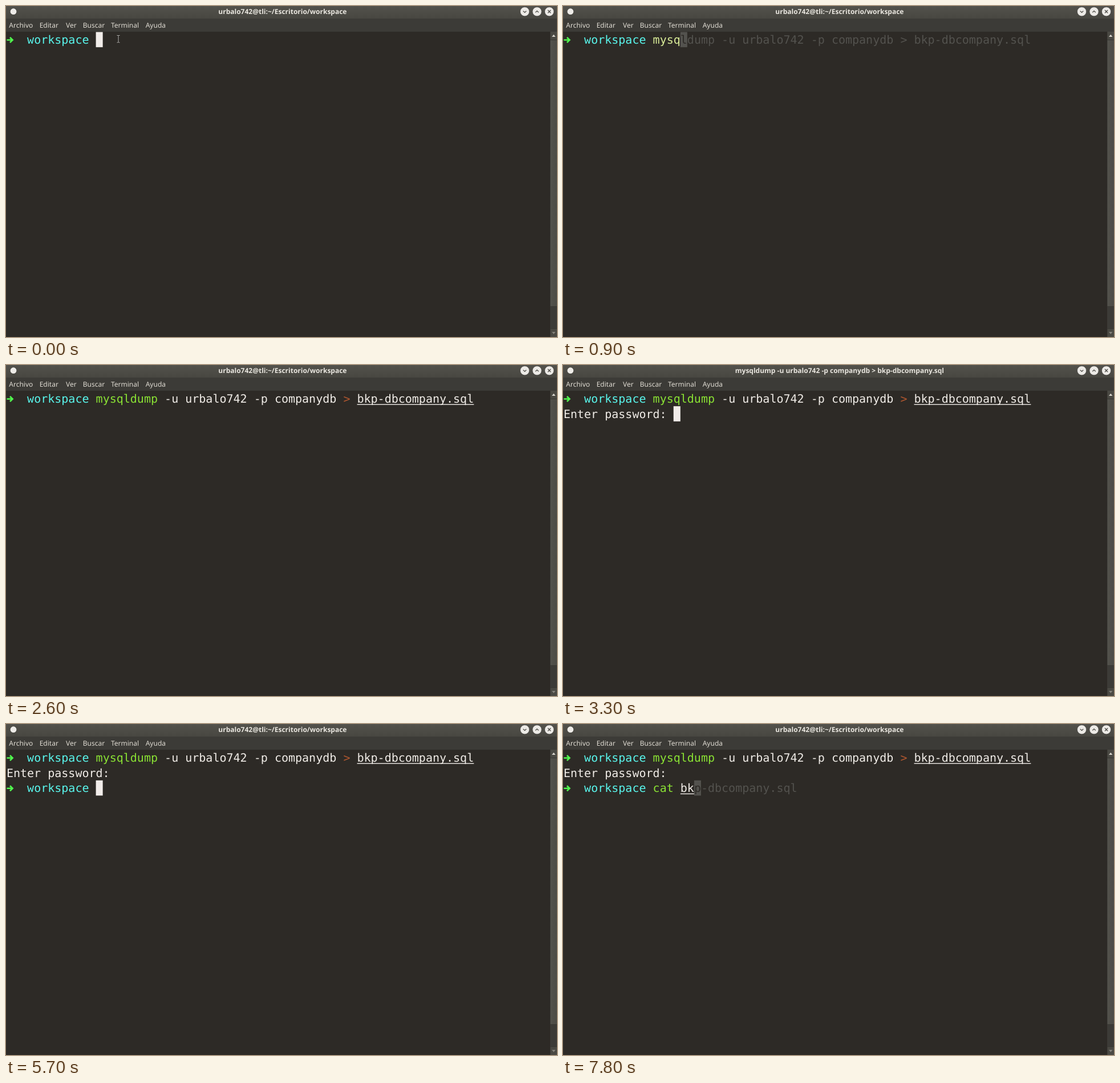
An HTML page that plays this animation: 966x580 px, repeating every 8 s.

```html
<!DOCTYPE html>
<html lang="es">
<head>
<meta charset="utf-8">
<title>Terminal</title>
<style>
  html, body { margin: 0; width: 100%; height: 100%; overflow: hidden; background: #2d2a26; }
  svg { display: block; width: 966px; height: 580px; }
  text { white-space: pre; text-rendering: geometricPrecision; }
  .ui { font: 12px "Noto Sans", "Open Sans", sans-serif; fill: #dfdbd2; }
  #title { font-weight: 600; fill: #e9e6df; text-anchor: middle; }
  #screen { font: 20px "DejaVu Sans Mono", monospace; }
</style>
</head>
<body>
<svg viewBox="0 0 966 580">
  <defs>
    <linearGradient id="bar" x2="0" y2="1">
      <stop offset="0" stop-color="#53524c"/>
      <stop offset="1" stop-color="#484741"/>
    </linearGradient>
    <linearGradient id="thumb">
      <stop offset="0" stop-color="#53524c"/>
      <stop offset="1" stop-color="#4c4b45"/>
    </linearGradient>
  </defs>
  <rect width="966" height="580" fill="#2d2a26"/>
  <rect width="966" height="22" fill="url(#bar)"/>
  <rect y="22" width="966" height="23" fill="#3c3b37"/>
  <circle cx="13" cy="9.7" r="5.4" fill="#eeece8"/>
  <g fill="#eceae6" stroke="#3a3935" stroke-width=".7">
    <circle cx="909.5" cy="9.8" r="8.1"/>
    <circle cx="931" cy="9.8" r="8.1"/>
    <circle cx="952.5" cy="9.8" r="8.1"/>
  </g>
  <path d="M906.8 8.8l2.7 2.6 2.7-2.6M928.3 11.2l2.7-2.6 2.7 2.6M950 7.3l5 5m0-5l-5 5" fill="none" stroke="#4b4a45" stroke-width="1.3"/>
  <text id="title" class="ui" x="484.9" y="14"></text>
  <g id="menu"></g>

  <rect x="954" y="45" width="12" height="535" fill="#3c3b37"/>
  <rect x="954.5" y="45" width="11.5" height="15" fill="#4a4943"/>
  <rect x="954.5" y="60" width="11.5" height="466.5" fill="url(#thumb)"/>
  <rect x="954.5" y="566" width="11.5" height="14" fill="#4a4943"/>
  <path d="M954 59.5h12M954 526.5h12M954 565.5h12" stroke="#393833"/>
  <path d="M957 54l3.2-4 3.2 4z" fill="#d8d5cd"/>
  <path d="M957 571l3.2 4 3.2-4z" fill="#85837c"/>

  <g id="screen"></g>
  <g id="pointer" fill="none">
    <path d="M194.5 51.5h2l.5.5.5-.5h2M197 52v11.5M194.5 64h2l.5-.5.5.5h2" stroke="#181714" stroke-width="2.6"/>
    <path d="M194.5 51.5h2l.5.5.5-.5h2M197 52v11.5M194.5 64h2l.5-.5.5.5h2" stroke="#c9c7c2"/>
  </g>
</svg>
<script>
const LOOP = 8000, PROMPT = 13;
const X0 = 0.95, CELL = 12.05, Y0 = 45.6, LINE = 26.6, ASCENT = 20.5;
const C = {
  bg: '#2d2a26', fg: '#f0ece7', dim: '#53524e', cyan: '#59f5ec', arrow: '#50fa4e',
  ok: '#8ae234', partial: '#d9ec97', redirect: '#b0572f', cursor: '#f2edea'
};
const HOME = 'urbalo742@tli:~/Escritorio/workspace';
const DUMP = 'mysqldump -u urbalo742 -p companydb > bkp-dbcompany.sql';
const SHOW = 'cat bkp-dbcompany.sql';
const KNOWN = ['mysql', 'mysqld', 'mysqldump', 'cat'];

// time, active row, typed characters, cursor visible
const STEPS = [
  [0, 0, 0, 1], [200, 0, 0, 0], [400, 0, 1, 1], [700, 0, 2, 1], [800, 0, 3, 1],
  [900, 0, 4, 1], [1000, 0, 5, 1], [1200, 0, 6, 1], [1300, 0, 7, 1], [1500, 0, 8, 1],
  [2100, 0, DUMP.length, 1], [2600, 0, DUMP.length, 0],
  [3300, 1, 0, 1], [3900, 1, 0, 0], [4000, 1, 0, 1],
  [5700, 2, 0, 1], [6300, 2, 0, 0], [6400, 2, 1, 1], [6600, 2, 2, 1],
  [6800, 2, 3, 1], [7000, 2, 4, 1], [7700, 2, 5, 1], [7800, 2, 6, 1]
];

const $ = id => document.getElementById(id);
const screen = $('screen');

function add(parent, tag, attrs, text = '') {
  const el = document.createElementNS('http://www.w3.org/2000/svg', tag);
  for (const k in attrs) el.setAttribute(k, attrs[k]);
  el.textContent = text;
  parent.append(el);
}

const colX = col => X0 + col * CELL;
const rowY = row => Y0 + row * LINE;
const baseY = row => rowY(row) + ASCENT;

// Each word is placed on the character grid.
function write(row, col, str, fill) {
  for (const m of str.matchAll(/\S+/g))
    add(screen, 'text', { x: colX(col + m.index), y: baseY(row), fill }, m[0]);
}

function block(row, col, fill) {
  add(screen, 'rect', { x: colX(col), y: rowY(row), width: CELL, height: LINE, fill });
}

function prompt(row) {
  const y = rowY(row) + 13.9;
  add(screen, 'path', {
    d: `M1.5 ${y}h9M7 ${y - 4.5}l4.6 4.5-4.6 4.5`,
    fill: 'none', stroke: C.arrow, 'stroke-width': 2.6
  });
  write(row, 3, 'workspace', C.cyan);
}

function command(row, cmd, n) {
  prompt(row);
  for (const m of cmd.slice(0, n).matchAll(/\S+/g)) {
    const word = m[0], col = PROMPT + m.index;
    let fill = C.fg;
    if (!m.index) fill = KNOWN.includes(word) ? C.ok : C.partial;
    else if (word === '>') fill = C.redirect;
    write(row, col, word, fill);
    if (m.index && word[0] === 'b')
      add(screen, 'rect', {
        x: colX(col), y: baseY(row) + 2.4, width: word.length * CELL, height: 1.4, fill
      });
  }
  if (n) write(row, PROMPT + n, cmd.slice(n), C.dim);
}

function caret(row, cmd, n) {
  const hint = n > 0 && n < cmd.length;
  block(row, PROMPT + n, hint ? C.dim : C.cursor);
  if (hint) write(row, PROMPT + n, cmd[n], C.bg);
}

function draw([, row, n, on]) {
  screen.replaceChildren();
  $('title').textContent = row === 1 ? DUMP : HOME;
  $('pointer').style.display = row || n ? 'none' : '';
  command(0, DUMP, row ? DUMP.length : n);
  if (row) write(1, 0, 'Enter password:', C.fg);
  if (row === 2) command(2, SHOW, n);
  if (!on) return;
  if (row === 1) block(1, 16, C.cursor);
  else caret(row, row ? SHOW : DUMP, n);
}

[['Archivo', 5.3], ['Editar', 58.7], ['Ver', 105], ['Buscar', 134.7], ['Terminal', 184], ['Ayuda', 244.7]]
  .forEach(([label, x]) => add($('menu'), 'text', { class: 'ui', x, y: 38 }, label));

const start = performance.now();
let shown;
function tick() {
  const t = (performance.now() - start) % LOOP;
  const step = STEPS.findLast(s => s[0] <= t);
  if (step !== shown) draw(shown = step);
  requestAnimationFrame(tick);
}
tick();
</script>
</body>
</html>
```
